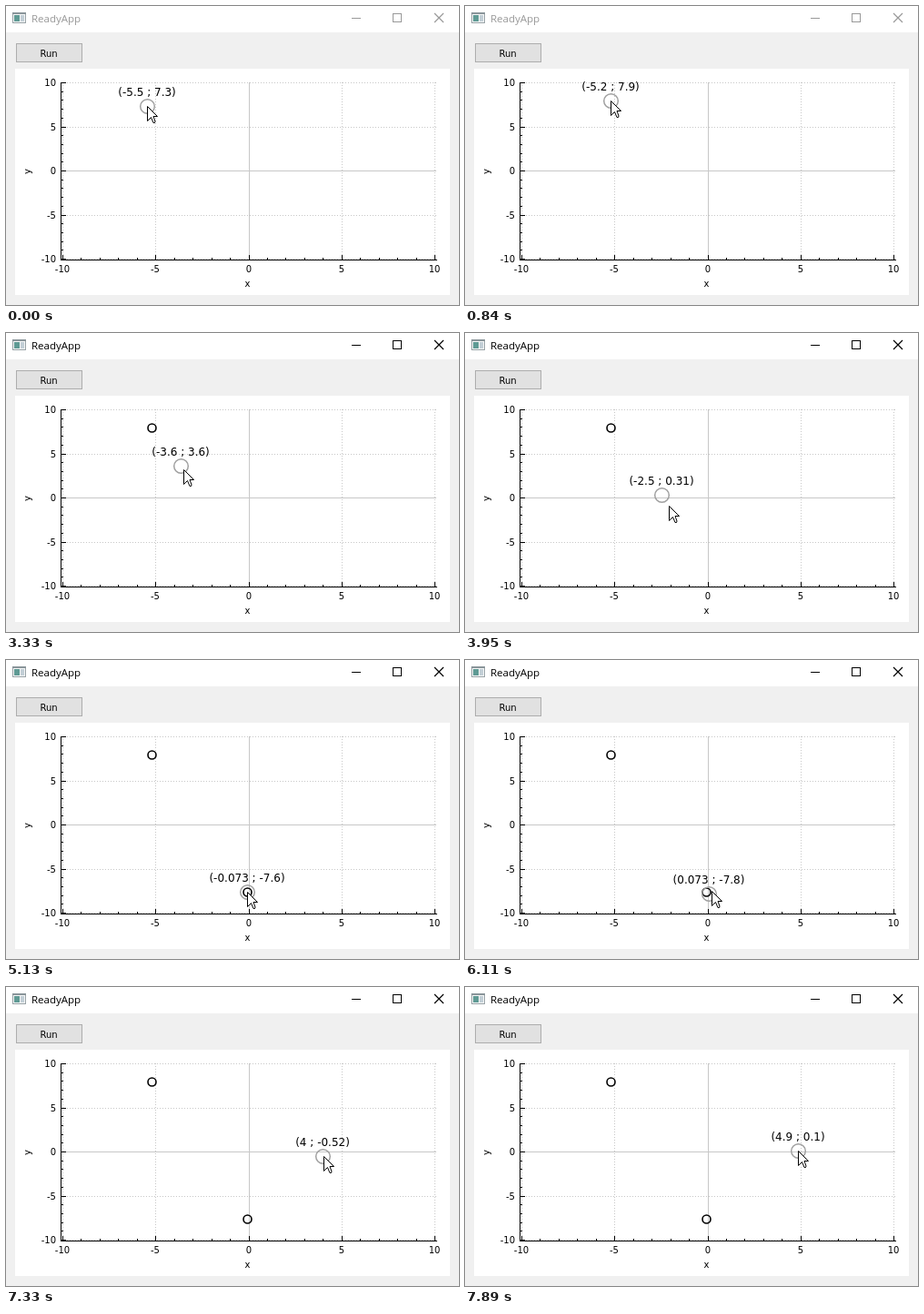
An HTML page for the animation above (8000 ms loop, 498 px wide and 329 px high).

```html
<!DOCTYPE html>
<html>
<head>
<meta charset="utf-8">
<style>
  html, body { margin: 0; width: 100%; height: 100%; overflow: hidden; background: #f0f0f0; }
  svg { display: block; }
  text { font: 10px "DejaVu Sans", sans-serif; }
  #title { font: 11.5px "Open Sans", sans-serif; }
  #label { font-size: 12px; }
  .mid { text-anchor: middle; }
  .end { text-anchor: end; }
  .crisp { shape-rendering: crispEdges; }
</style>
</head>
<body>
<svg width="498" height="329" viewBox="0 0 498 329">
  <rect width="498" height="329" fill="#f0f0f0"/>
  <rect width="498" height="29" fill="#fff"/>
  <g class="crisp">
    <rect x="7.5" y="7.5" width="14" height="11" fill="#f4f6f6" stroke="#98a2a6"/>
    <path d="M7 8h15" stroke="#8a959a" stroke-width="2"/>
    <rect x="9" y="10" width="6" height="7" fill="#5f9a94"/>
    <rect x="16" y="10" width="4" height="7" fill="#c3cfd6"/>
  </g>
  <text id="title" x="28" y="17.5">ReadyApp</text>
  <g id="controls" fill="none">
    <path class="crisp" d="M380 13.5h10M425.5 8.5h9v9h-9z"/>
    <path d="M471 8l10 10M481 8l-10 10" stroke-width="1.2"/>
  </g>
  <rect x="11.5" y="41.5" width="72" height="20" fill="#e1e1e1" stroke="#adadad"/>
  <text class="mid" x="47" y="56">Run</text>
  <rect x="10" y="69" width="478" height="249" fill="#fff"/>
  <g id="plot" class="crisp"></g>
  <text class="mid" x="265.5" y="309">x</text>
  <text class="mid" transform="translate(26.5 182) rotate(-90)">y</text>
  <g id="dots" fill="none" stroke="#000" stroke-width="1.6"></g>
  <circle id="ring" r="7.8" fill="none" stroke="#a0a0a0" stroke-width="1.5"/>
  <text id="label" class="mid"></text>
  <path id="cursor" d="M.5.5V16.5L4.5 12.5L7 18.5H8.5L9 17L7 11.5H11.5Z" fill="#fff" stroke="#000"/>
</svg>
<script>
const $ = id => document.getElementById(id);
const LOOP = 8000;
const X0 = 266.5, Y0 = 181, SX = 20.45, SY = 9.7;
const toX = v => Math.round(X0 + SX * v);
const toY = v => Math.round(Y0 - SY * v);

// Grid, axes, ticks and tick labels
const line = (d, color, dash = '') =>
  `<path d="${d}" stroke="${color}" stroke-dasharray="${dash}"/>`;
let grid = '', axes = line('M60.5 84V280M60 279.5H474', '#000'), texts = '';
for (let v = -10; v <= 10; v++) {
  const x = toX(v), y = toY(v), major = v % 5 === 0, len = major ? 6 : 3;
  axes += line(`M60 ${y + .5}h${len}M${x + .5} 280v${-len}`, '#000');
  if (!major) continue;
  const dash = v ? '1 2' : '';
  grid += line(`M61 ${y + .5}H473`, '#c8c8c8', dash) + line(`M${x + .5} 84V279`, '#c8c8c8', dash);
  texts += `<text class="end" x="55" y="${y + 4}">${v}</text>` +
           `<text class="mid" x="${x}" y="293">${v}</text>`;
}
$('plot').innerHTML = grid + axes + texts;

// Pointer moves: start, end, goal and pace (above 1 speeds up along the way)
const HOME = { x: 155, y: 110 };
const moves = [
  { start: 540, end: 840, x: 160, y: 104 },
  { start: 3040, end: 3470, x: 216, y: 178, pace: 1.4 },
  { start: 3950, end: 4080, x: 265, y: 255 },
  { start: 5400, end: 5410, x: 268, y: 257 },
  { start: 6110, end: 6470, x: 318, y: 211 },
  { start: 6760, end: 6770, x: 334, y: 198 },
  { start: 6770, end: 7060, x: 348, y: 186 },
  { start: 7330, end: 7610, x: 365, y: 182 },
  { start: 7880, end: 7890, x: 366, y: 180 }
];
const clicks = [2170, 5130];
const STEP = 140, LEAD = 20;

// Screen updates come about every STEP ms; lead runs ahead of the update
function pointer(t, lead = 0) {
  const i = moves.findLastIndex(m => m.start <= t);
  if (i < 0) return HOME;
  const { start, end, x, y, pace = 1 } = moves[i], from = moves[i - 1] || HOME;
  const span = end - start, steps = Math.max(1, Math.round(span / STEP));
  const done = Math.floor((t - start) / span * steps) / steps;
  const p = Math.min(1, done + lead / span) ** pace;
  return { x: Math.round(from.x + (x - from.x) * p), y: Math.round(from.y + (y - from.y) * p) };
}

$('dots').innerHTML = clicks.map(pointerAt => {
  const { x, y } = pointer(pointerAt);
  return `<circle cx="${x + .5}" cy="${y + .5}" r="4.5"/>`;
}).join('');

const short = v => +v.toPrecision(2);
const move = (id, x, y) => $(id).setAttribute('transform', `translate(${x} ${y})`);

function draw(t) {
  const { x, y } = pointer(t), tip = pointer(t, LEAD);
  move('ring', x + .5, y + .5);
  move('label', x, y - 11);
  move('cursor', tip.x, tip.y);
  $('label').textContent = `(${short((x - X0) / SX)} ; ${short((Y0 - y) / SY)})`;
  const ink = t < clicks[0] ? '#999' : '#000';
  $('title').setAttribute('fill', ink);
  $('controls').setAttribute('stroke', ink);
  clicks.forEach((at, i) => $('dots').children[i].style.display = t < at ? 'none' : '');
}

const begin = performance.now();
function tick() {
  draw((performance.now() - begin) % LOOP);
  requestAnimationFrame(tick);
}
tick();
</script>
</body>
</html>
```
